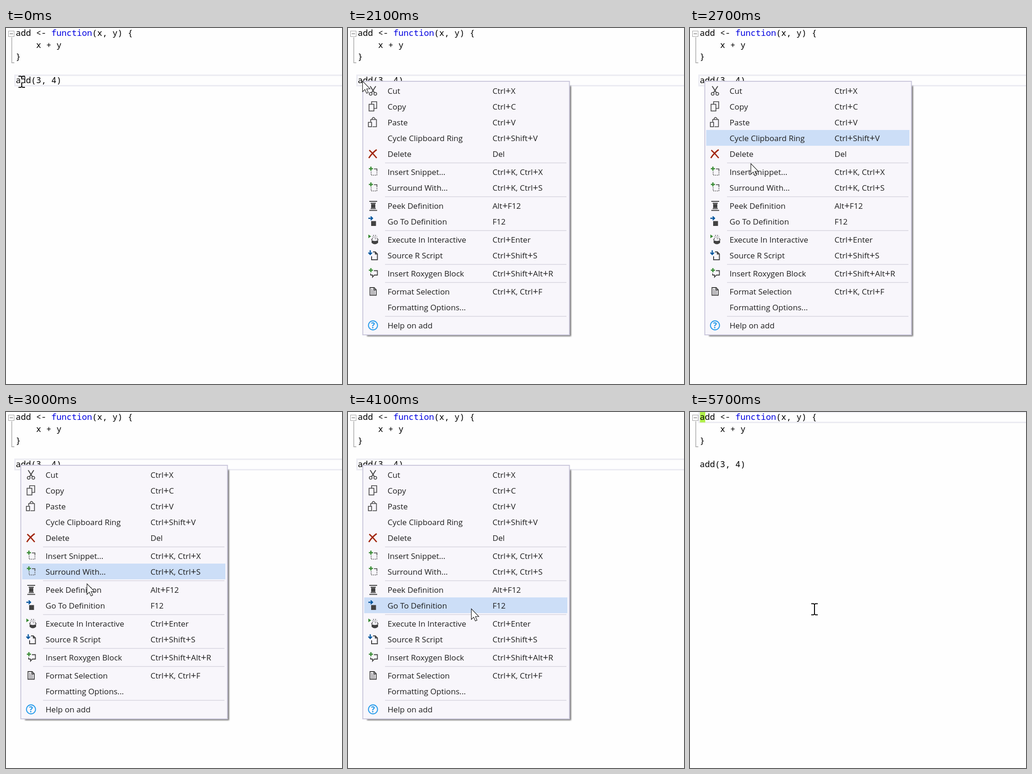
These frames come from a looping animation (726 px wide and 768 px high, 6000 ms). An HTML page:

```html
<!DOCTYPE html>
<html lang="en">
<head>
<meta charset="utf-8">
<title>Go To Definition</title>
<style>
  html, body { margin: 0; width: 100%; height: 100%; overflow: hidden; background: #fefefe; }
  svg { display: block; width: 726px; height: 768px; }
  .code { font: 18.33px "Noto Sans Mono", monospace; fill: #000; }
  .code .key { fill: #0000e0; }
  .menu text { font: 17.1px "Open Sans", "Noto Sans", sans-serif; fill: #1e1e1e; }
  .menu .plus { font-size: 20.5px; }
  .menu .help { font-size: 17px; font-weight: 700; fill: #1c97ea; text-anchor: middle; }
  .shadow { fill: #505050; opacity: .8; filter: blur(1.5px); }
  .sep { stroke: #dfdde6; stroke-width: 2; }
  .icon { fill: none; stroke: #424242; stroke-width: 1.6; }
  .icon .solid { fill: #424242; stroke: none; }
  .icon .green { stroke: #388a34; stroke-width: 2.6; }
  .icon .blue { stroke: #00539c; stroke-width: 2.4; }
  #beam { mix-blend-mode: difference; }
</style>
</head>
<body>
<svg viewBox="0 0 726 768">
  <rect width="726" height="768" fill="#fefefe"/>
  <rect id="line" x="19.5" width="720" height="22.5" fill="none" stroke="#ebebf2" stroke-width="3"/>
  <rect id="caret" x="21.5" y="0" width="11.5" height="22.5" fill="#b0f04a"/>
  <g fill="none" stroke="#a2a2a2">
    <rect x="5.5" y="6.5" width="12" height="12" fill="#fff"/>
    <path d="M8 12.5H15" stroke="#555"/>
    <path d="M12.5 20V75H18" stroke-width="1.4"/>
  </g>
  <g class="code">
    <text x="21" y="17">add &lt;- <tspan class="key">function</tspan>(x, y) {</text>
    <text x="65" y="43">x + y</text>
    <text x="21" y="68">}</text>
    <text x="21" y="119">add(3, 4)</text>
  </g>
  <g id="menu" class="menu">
    <rect class="shadow" x="41" y="125" width="441" height="540"/>
    <rect x="32" y="115" width="446.5" height="547" fill="#f8f6fb" stroke="#cbc8dc" stroke-width="2"/>
    <rect id="bar" x="35" width="439" height="34" fill="#ccdef7"/>
    <g id="rows"></g>
  </g>
  <path id="beam" fill="none" stroke="#fff" stroke-width="2"
    d="M-7 -12H-2L0 -10.5L2 -12H7M0 -11V11M-7 12H-2L0 10.5L2 12H7"/>
  <path id="arrow" fill="#fff" stroke="#111" stroke-width="1.1" stroke-linejoin="miter"
    d="M.5 .5V23.4L5.6 18.6L9.2 26.8L12.8 25.2L9.3 17.2H16.6Z"/>
</svg>
<script>
const $ = id => document.getElementById(id);
const LOOP = 6000, STEP = 100;

const plus = '<path class="green" d="M-9 -7H0M-4.5 -11.5V-2.5"/>';
const snippet = plus +
  '<path d="M2 -6.5H8.5V-3" /><path stroke-dasharray="2 2" d="M8.5 -3V7H-4V-1"/>';

// Icons are drawn around the centre of the icon column of their row.
const icons = {
  cut: '<path stroke-width="2" d="M-6 -10L3 4M6 -10L-3 4"/><circle cx="-5" cy="6.5" r="3"/><circle cx="5" cy="6.5" r="3"/>',
  copy: '<path d="M-3 -5V-10.5H8V4H2"/><rect x="-8.5" y="-5" width="10.5" height="14.5"/>',
  paste: '<path d="M-5 -1V-6H7.5V9.5H-1"/><path d="M-2 -6V-8L0 -10.5H2L4.5 -8V-6"/><rect x="-10" y="0" width="7" height="9.5"/>',
  remove: '<path stroke="#a1260d" stroke-width="2.8" d="M-8 -8Q0 -1 8 9M8 -9Q-2 -2 -9 9"/>',
  snippet,
  peek: '<path stroke-width="2" d="M-8 -9.5H9M-5 -5.5H6M-5 6H6M-8 10H9"/><rect class="solid" x="-4" y="-4" width="9" height="8.5"/>',
  go: '<path class="blue" d="M-10 -7H-1M-5 -11L-1 -7L-5 -3"/><rect class="solid" x="-4" y="-1" width="10.5" height="10.5"/>',
  run: '<path fill="#388a34" stroke="none" d="M-10 -11L-4 -7L-10 -3Z"/><path class="solid" d="M-3 1Q4 5 11 1V7Q4 13 -3 7Z"/>' +
    '<path d="M-3 1Q-3 -2 0 -2M11 1Q11 -2 8 -2"/><path stroke-dasharray="2 2.4" d="M0 -9H9M-1 -5.5H9M4 -2H6"/>',
  source: '<path class="blue" d="M-6 -11V-2M-10 -6L-6 -2L-2 -6"/><path stroke-width="2" d="M-3 2V9.5H9.5V-3L5 -7.5H0M5 -7.5V-3H9.5"/>',
  doc: plus + '<path stroke-width="1.8" d="M2 -6H9.5V3.5H3L-1 8V3.5H-5V0"/>',
  format: '<path stroke-width="1.8" d="M-6.5 -8.5H2.5L7 -4V8H-6.5ZM2 -8V-3.5H7"/><path d="M-4 -4H0M-4 -1H5M-4 2H5M-4 5H5" stroke-dasharray="2 1"/>',
  help: '<circle r="9.8" stroke="#1c97ea" stroke-width="1.9"/><text class="help" stroke="none" y="6">?</text>'
};

// Label, shortcut, icon; null is a separator.
const items = [
  ['Cut', 'Ctrl+X', 'cut'],
  ['Copy', 'Ctrl+C', 'copy'],
  ['Paste', 'Ctrl+V', 'paste'],
  ['Cycle Clipboard Ring', 'Ctrl+Shift+V'],
  ['Delete', 'Del', 'remove'],
  null,
  ['Insert Snippet...', 'Ctrl+K, Ctrl+X', 'snippet'],
  ['Surround With...', 'Ctrl+K, Ctrl+S', 'snippet'],
  null,
  ['Peek Definition', 'Alt+F12', 'peek'],
  ['Go To Definition', 'F12', 'go'],
  null,
  ['Execute In Interactive', 'Ctrl+Enter', 'run'],
  ['Source R Script', 'Ctrl+Shift+S', 'source'],
  null,
  ['Insert Roxygen Block', 'Ctrl+Shift+Alt+R', 'doc'],
  null,
  ['Format Selection', 'Ctrl+K, Ctrl+F', 'format'],
  ['Formatting Options...', ''],
  null,
  ['Help on add', '', 'help']
];

const tops = [];
let y = 118, html = '';
for (const item of items) {
  if (!item) {
    html += `<path class="sep" d="M80 ${y + 3}H472"/>`;
    y += 5;
    continue;
  }
  const [label, keys, icon] = item;
  const shortcut = keys.replace(/\+/g, '<tspan class="plus">+</tspan>');
  html += `<text x="85.5" y="${y + 23.5}">${label}</text><text x="312.2" y="${y + 23.5}">${shortcut}</text>`;
  if (icon) html += `<g class="icon" transform="translate(54 ${y + 17.5})">${icons[icon]}</g>`;
  tops.push(y);
  y += 34;
}
$('rows').innerHTML = html;

// Time, x, y
const beamPath = [
  [0, 34, 116], [600, 54, 116], [800, 54, 116], [1100, 39, 116],
  [1400, 39, 116], [1600, 31, 114], [4599, 31, 114], [4600, 269, 425.5]
];
const arrowPath = [
  [2200, 31, 114], [2300, 38, 124], [2500, 84, 206], [2700, 131, 292], [2900, 165, 357],
  [3100, 184, 383], [3300, 204, 406], [3400, 226, 416], [3600, 266, 424]
];
// Time, highlighted row
const hover = [
  [0, -1], [2400, 0], [2500, 1], [2600, 2], [2700, 3], [2800, 4],
  [2900, 5], [3000, 6], [3200, 7], [3400, 8]
];
// Time, menu opacity
const fade = [[0, 0], [1800, .35], [1900, .8], [2000, 1], [4600, 0]];

const held = (table, t) => table.filter(k => k[0] <= t).pop()[1];

function along(path, t) {
  const i = path.findIndex(k => k[0] > t);
  if (i === 0) return path[0].slice(1);
  if (i < 0) return path[path.length - 1].slice(1);
  const [t0, x0, y0] = path[i - 1], [t1, x1, y1] = path[i];
  const p = (t - t0) / (t1 - t0);
  return [x0 + (x1 - x0) * p, y0 + (y1 - y0) * p];
}

const show = (el, on) => el.setAttribute('visibility', on ? 'visible' : 'hidden');
const place = (el, [x, y]) => el.setAttribute('transform', `translate(${x} ${y})`);

function draw(now) {
  const t = Math.floor((now % LOOP) / STEP) * STEP;
  const pointing = t >= 1600 && t < 4600;
  const jumped = t >= 4600;
  const row = held(hover, t);

  place($('beam'), along(beamPath, t));
  place($('arrow'), along(arrowPath, t));
  show($('beam'), !pointing);
  show($('arrow'), pointing);

  $('menu').setAttribute('opacity', held(fade, t));
  show($('bar'), row >= 0);
  if (row >= 0) $('bar').setAttribute('y', tops[row]);

  $('line').setAttribute('y', jumped ? 0 : 102);
  show($('caret'), jumped && (t < 5200 || t >= 5700));
}

const start = performance.now();
function tick() {
  draw(performance.now() - start);
  requestAnimationFrame(tick);
}
tick();
</script>
</body>
</html>
```
